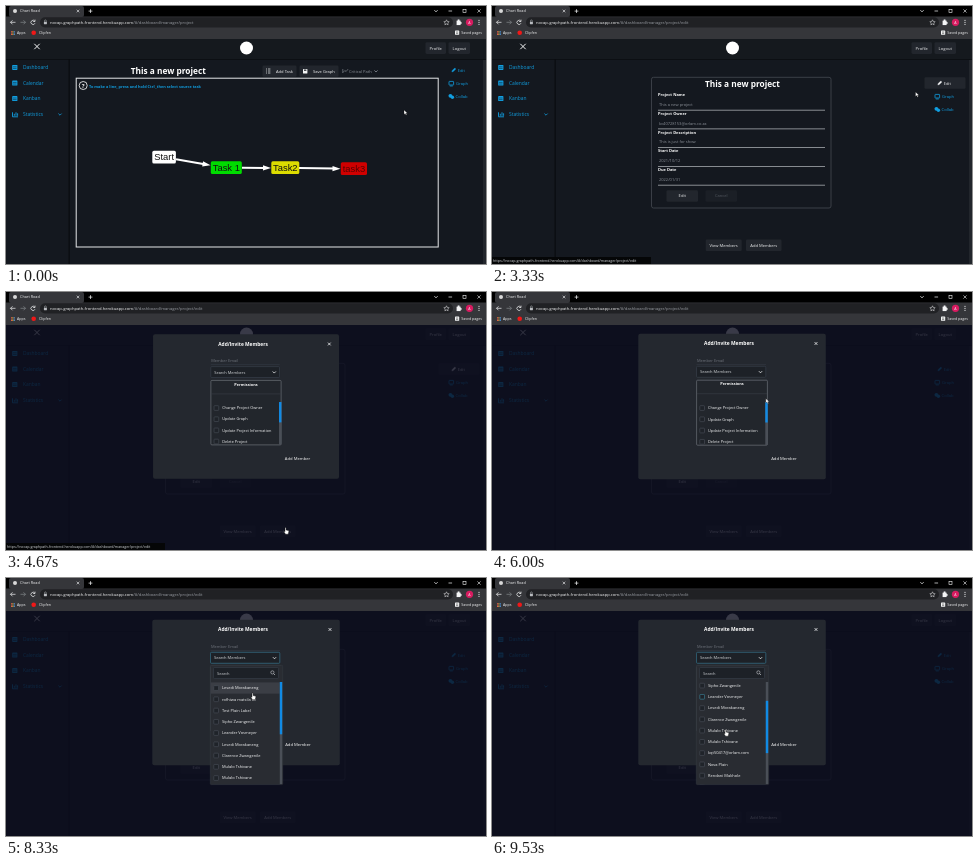
An HTML page for the animation above (9590 ms loop, 480 px wide and 258 px high).

```html
<!DOCTYPE html>
<html lang="en">
<head>
<meta charset="utf-8">
<title>Project dashboard</title>
<style>
html, body { margin: 0; width: 100%; height: 100%; overflow: hidden; background: #14181f; }
svg { display: block; width: 480px; height: 258px; font-family: "Open Sans", "Noto Sans", sans-serif; font-weight: 500; }
</style>
</head>
<body>
<svg id="stage" viewBox="0 0 480 258"></svg>
<script>
const LOOP = 9590;
const BLUE = '#119ee0', BUTTON = '#22262d', PALE = '#f4f5f6', DIM = '#8b9098', TOOLBAR = '#35363a';
const ROW = 11.25, LIST_TOP = 104.4, SCROLL = 36.2;

// Drawing helpers; text is placed by its vertical middle.
const text = (x, y, s, size, fill = PALE, extra = '') =>
  `<text x="${x}" y="${y + size * .35}" font-size="${size}" fill="${fill}" ${extra}>${s}</text>`;
const mid = (x, y, s, size, fill, extra = '') => text(x, y, s, size, fill, 'text-anchor="middle" ' + extra);
const BOLD = 'font-weight="700"';
const rect = (x, y, w, h, fill, r = 0, extra = '') =>
  `<rect x="${x}" y="${y}" width="${w}" height="${h}" rx="${r}" fill="${fill}" ${extra}/>`;
const dot = (x, y, r, fill) => `<circle cx="${x}" cy="${y}" r="${r}" fill="${fill}"/>`;
const path = (d, stroke = PALE, w = .7, fill = 'none') =>
  `<path d="${d}" stroke="${stroke}" stroke-width="${w}" fill="${fill}"/>`;
const cross = (x, y, r, w, color) => path(`M${x - r} ${y - r}l${2 * r} ${2 * r}m0 ${-2 * r}l${-2 * r} ${2 * r}`, color, w);
const chevron = (x, y, color) => path(`M${x - 1.6} ${y - .8}l1.6 1.6l1.6-1.6`, color, .8);
const button = (x, y, w, h, s, fill = BUTTON, color = PALE) =>
  rect(x, y, w, h, fill, 1.3) + mid(x + w / 2, y + h / 2, s, 4.1, color);
const group = (id, body, extra = '') => `<g id="${id}" ${extra}>${body}</g>`;

const HOST = 'nocap-graphpath-frontend.herokuapp.com';
const PATH = '/#/dashboard/manager/project';

function browser() {
  let apps = '';
  for (let i = 0; i < 9; i++)
    apps += rect(5 + i % 3 * 1.4, 25.2 + (i / 3 | 0) * 1.4, 1, 1, ['#e25a4a', '#f0b93a', '#4c9be8'][i % 3]);
  return rect(0, 0, 480, 33, TOOLBAR) + rect(0, 0, 480, 10.5, '#000') +
    rect(3, 0, 75, 11, TOOLBAR, 2) + dot(9, 5, 2, '#d8d8d8') + text(14, 5, 'Chart Road', 3.8) +
    cross(72, 5, 1.3, .6) + path('M84.5 3.2v3.8M82.6 5.1h3.8') +
    chevron(430, 5) + path('M442.5 5h3.6') + rect(457, 3.4, 3, 3, 'none', 0, `stroke="${PALE}" stroke-width=".6"`) + cross(473, 5, 1.6, .6) +
    path('M9.5 16.3h-5m2-2l-2 2l2 2') + path('M14.5 16.3h5m-2-2l2 2l-2 2', '#85888c') +
    path('M28.8 15.2a2.1 2.1 0 1 0 .2 2M29 13.6v1.9h-1.9') +
    rect(34, 11.3, 413, 10.2, '#202124', 5) +
    rect(37.9, 15.7, 3, 2.5, '#b9bcc0', .4) + path('M38.5 15.8v-1a.9 .9 0 0 1 1.8 0v1', '#b9bcc0', .5) +
    `<text x="44" y="17.8" font-size="4.15" fill="${PALE}">${HOST}<tspan id="address" fill="#999da3"></tspan></text>` +
    path('M440.5 13.8l.8 1.7l1.8.2l-1.3 1.3l.3 1.8l-1.6-.9l-1.6.9l.3-1.8l-1.3-1.3l1.8-.2z', PALE, .5) +
    path('M450.7 14.8h1.1a.9 .9 0 1 1 1.6 0h1.1v1.4a.8 .8 0 1 1 0 1.5v1.2h-3.8z', PALE, .2, PALE) +
    dot(463.5, 16.3, 3.6, '#d81b60') + mid(463.5, 16.3, 'A', 3.6) +
    [14.3, 16.3, 18.3].map(y => dot(473, y, .6, PALE)).join('') +
    apps + text(11, 26.8, 'Apps', 3.7) + dot(27.7, 26.8, 2.3, '#f01818') + text(33, 26.8, 'Clipfen', 3.7) +
    rect(449, 24.6, 4.2, 4.2, PALE, .6) + path('M450 26h2.2m-2.2 1.4h2.2', '#222', .5) +
    text(476, 26.8, 'Saved pages', 3.6, PALE, 'text-anchor="end"');
}

function shell() {
  const items = ['Dashboard', 'Calendar', 'Kanban', 'Statistics'].map((s, i) => {
    const y = 61.5 + i * 15.6;
    const icon = i == 3 ? path(`M6.5 ${y - 2}v4.5h5.5M8.3 ${y + 1.5}v-2M10 ${y + 1.5}v-3.5M11.6 ${y + 1.5}v-2.5`, BLUE, .9)
      : rect(6.2, y - 2.6, 5.2, 5, BLUE, .6) + path(`M7 ${y - .7}h3.6m-3.6 1.6h3.6`, '#13171d', .5);
    return icon + text(17, y, s, 4.9, BLUE);
  });
  return rect(0, 33, 480, 225, '#14181f') + rect(0, 33, 480, 20.5, '#15191e') +
    rect(0, 53, 480, .8, '#0b0d11') + rect(62.5, 53, 1.3, 205, '#0b0d11') + rect(477, 54, 3, 204, '#22262c') +
    cross(31, 40.5, 2.7, 1) + dot(240.5, 42, 6.5, '#fff') +
    button(419.5, 36.3, 20.5, 11.6, 'Profile') + button(442.5, 36.3, 21.5, 11.6, 'Logout') +
    items.join('') + chevron(54, 108.4, BLUE);
}

// Side links at their lower position; the graph page shifts them up.
function links(active) {
  const c = [0, 1, 2].map(i => i == active ? PALE : BLUE);
  return path('M445.8 79l.4-1.5l2.6-2.6l1.1 1.1l-2.6 2.6z', c[0], .3, c[0]) + text(451.7, 77.2, 'Edit', 4, c[0]) +
    rect(443, 88.4, 4.6, 3.6, 'none', .4, `stroke="${c[1]}" stroke-width=".8"`) + path('M443.8 93h3', c[1], .7) +
    text(450, 90.3, 'Graph', 4.2, c[1]) +
    dot(444.4, 102.8, 1.9, c[2]) + dot(446.4, 104.2, 1.7, c[2]) + text(449.5, 103.5, 'Collab', 4.2, c[2]);
}

function arrow(x1, y1, x2, y2) {
  const angle = Math.atan2(y2 - y1, x2 - x1) * 180 / Math.PI;
  const len = Math.hypot(x2 - x1, y2 - y1);
  return `<g transform="translate(${x1} ${y1}) rotate(${angle})">${path(`M0 0H${len - 6}`, '#fff', 2)}` +
    path(`M${len} 0l-8-2.6v5.2z`, 'none', 0, '#fff') + '</g>';
}

function graphPage() {
  const node = (x, y, w, s, fill, color = '#111') => rect(x, y, w, 12.8, fill, 1.6) +
    mid(x + w / 2, y + 6.2, s, 9.4, color, 'font-family="Liberation Sans, sans-serif" font-weight="400"');
  return mid(162.3, 65.5, 'This a new project', 8.3, '#fff', BOLD) +
    rect(256.5, 59.5, 34, 11.2, BUTTON, 1.3) + path('M260 63h1m1 0h2.4M260 65h1m1 0h2.4M260 67h1m1 0h2.4', PALE, .7) + text(270, 65.2, 'Add Task', 4.1) +
    rect(293.5, 59.5, 39, 11.2, BUTTON, 1.3) + rect(297, 63, 4.4, 4.4, PALE, .5) + rect(298, 63.5, 2.4, 1.3, BUTTON) + text(307, 65.2, 'Save Graph', 4.1) +
    path('M336.8 67v-4M337 66.5l1.8-2l1.3 1l2-2.4', DIM, .6) + text(343, 65.2, 'Critical Path', 4.1, DIM) + chevron(370, 65.2, DIM) +
    rect(70.2, 72.2, 362, 168.8, 'none', 0, 'stroke="#e4e6e8"') +
    '<circle cx="77.2" cy="79.5" r="4" fill="none" stroke="#fff" stroke-width=".8"/>' + mid(77.2, 79.5, '?', 6, '#fff', BOLD) +
    text(83, 81, 'To make a line, press and hold Ctrl ,then select source task', 3.85, BLUE, BOLD) +
    arrow(170, 153.2, 204.5, 159.2) + arrow(236, 161.8, 265, 162) + arrow(293, 162, 334.5, 162.7) +
    node(146.3, 144.8, 23.6, 'Start', '#fff') + node(204.8, 155.3, 31, 'Task 1', '#00dc00') +
    node(265.3, 155.3, 28, 'Task2', '#dcdc00') + node(334.8, 156.2, 26.2, 'task3', '#d00000', '#5a0000');
}

function editPage() {
  const fields = [['Project Name', 'This a new project'], ['Project Owner', 'kv40728153@orlam.co.za'],
    ['Project Description', 'This is just for show'], ['Start Date', '2021/10/12'], ['Due Date', '2022/01/31']];
  return rect(159.5, 71.3, 179.5, 130.7, 'none', 2, 'stroke="#444951" stroke-width=".8"') +
    mid(250.5, 77.8, 'This a new project', 8.3, '#fff', BOLD) +
    fields.map(([label, value], i) => {
      const y = 88.8 + i * 18.75;
      return text(166, y, label, 4, '#fff', BOLD) + text(167, y + 9.7, value, 4, DIM) + rect(166, y + 15, 167, .7, '#b9bdc2');
    }).join('') +
    button(174.5, 184.3, 31.5, 11.5, 'Edit') + button(213.5, 184.3, 31.5, 11.5, 'Cancel', '#1b1f26', '#555a62') +
    button(213.7, 233.5, 36, 11.5, 'View Members') + button(254, 233.5, 35.5, 11.5, 'Add Members');
}

const check = y => rect(207.8, y - 2.3, 4.7, 4.7, '#1f2329', .6, 'stroke="#4a5059" stroke-width=".6"');

function modalBox() {
  const rights = ['Change Project Owner', 'Update Graph', 'Update Project Information', 'Delete Project'];
  return rect(146.3, 41.7, 187.5, 145.6, '#24282f', 2) +
    mid(237, 51.7, 'Add/Invite Members', 4.9, '#fff', BOLD) + cross(324, 51.5, 1.4, .8) +
    text(205, 68.3, 'Member Email', 4, '#70757d') + rect(204.5, 72, 69.5, .5, '#343b45') +
    rect(204.5, 74.3, 69.3, 11, '#1d2127', 1, 'stroke="#3c4450" stroke-width=".6"') + text(208, 80, 'Search Members', 4, '#d5d8db') + chevron(268.5, 80) +
    rect(204.6, 88.2, 70.8, 65, '#22262c', 1, 'stroke="#787d85" stroke-width=".6"') +
    mid(240, 92, 'Permissions', 3.9, '#fff', BOLD) + rect(205, 101.6, 70, .5, '#3c424b') +
    rights.map((s, i) => check(116 + i * ROW) + text(216, 116 + i * ROW, s, 3.9)).join('') +
    rect(273.3, 110, 2.4, 43, '#4a4f57') + rect(273.3, 110, 2.4, 20.5, '#118ae4') +
    text(279.2, 166.5, 'Add Member', 4.2, '#fff');
}

const people = ['Lesedi Morakaneng', 'rofhiwa matsila tb', 'Test Plain Label', 'Sipho Zwangenile', 'Leander Vosmeyer',
  'Lesedi Morakaneng', 'Clarence Zwangenile', 'Mulalo Tshivane', 'Mulalo Tshivane', 'kqt50417@orlam.com', 'Nova Plain', 'Rendani Makhole', 'Sipho Zwangenile'];

function dropdownBox() {
  return rect(204.5, 74.3, 69.3, 11, 'none', 1, 'stroke="#2a6f86" stroke-width=".6"') +
    rect(204.3, 87.3, 72.4, 119.3, '#292c32', 1, 'stroke="#383d45" stroke-width=".5"') +
    rect(207.5, 89.5, 65, 11, '#1d2127', 1, 'stroke="#3c4450" stroke-width=".5"') + text(211, 95.1, 'Search', 4, '#c9ccd0') +
    '<circle cx="266.4" cy="94.4" r="1.6" fill="none" stroke="#c9ccd0" stroke-width=".6"/>' + path('M267.6 95.6l1.4 1.4', '#c9ccd0') +
    '<clipPath id="listClip"><rect x="204.4" y="104" width="72" height="102.3"/></clipPath><g clip-path="url(#listClip)">' +
    group('list', rect(204.5, 0, 69.2, ROW, '#3b3e45', 0, 'id="hover"') + people.map((s, i) => {
      const y = 110 + i * ROW;
      return check(y) + text(216, y, s, 4);
    }).join('') + rect(207.8, 0, 4.7, 4.7, 'none', .6, 'id="hoverCheck" stroke="#2a7488" stroke-width=".6"')) + '</g>' +
    rect(273.8, 104, 2.4, 102, '#4a4f57') + rect(273.8, 104, 2.4, 52.3, '#118ae4', 0, 'id="thumb"');
}

document.getElementById('stage').innerHTML =
  browser() + shell() + group('graph', graphPage()) + group('edit', editPage()) +
  group('pill', rect(432.5, 71.2, 41, 11.6, BUTTON, 1.3)) +
  group('linksIdle', links(-1)) + group('linksGraph', links(1), 'transform="translate(0 -13)"') + group('linksEdit', links(0)) +
  group('backdrop', rect(0, 33, 480, 225, '#0c0d1e', 0, 'opacity=".81"')) +
  group('modal', modalBox()) + group('dropdown', dropdownBox()) +
  group('status', rect(0, 251, 159, 7, '#050607', 0, 'id="statusBack"') + text(1, 254.5, '', 3.57, '#d3d6da', 'id="statusText"')) +
  group('cursor', group('pointer', path('M0 0v4.6l1.2-1l.8 1.6l.8-.4l-.8-1.6h1.5z', '#000', .3, '#fff')) +
    group('hand', path('M0 .3q.7-.6 1.1.2v2l2.3.6q.6.3.4 1.2l-.6 2.4h-2.6l-1.9-2.6q.2-.7 1.3.2z', '#000', .4, '#fff')));

const el = {};
document.querySelectorAll('[id]').forEach(e => el[e.id] = e);
const show = (id, on) => el[id].style.display = on ? '' : 'none';
const write = (id, s) => { if (el[id].textContent !== s) el[id].textContent = s; };
const clamp = v => Math.max(0, Math.min(1, v));

// Cursor stops: time, x, y of the tip.
const stops = [[70, 398, 104], [520, 453, 64], [730, 451, 78], [2069, 451, 78], [2070, 451, 67], [2600, 451, 67], [2730, 451, 65],
  [3200, 451, 65], [3330, 423.5, 86], [3930, 281, 234], [4130, 281, 234], [4200, 279, 235.5],
  [4870, 279, 235.5], [5800, 275.5, 108], [5930, 275.5, 108], [6450, 242, 78], [7270, 242, 78], [7870, 246, 115],
  [8330, 246, 115], [9200, 233, 151.5]];

function cursorAt(t) {
  const next = stops.findIndex(s => s[0] > t);
  if (next < 1) return (next ? stops[stops.length - 1] : stops[0]).slice(1);
  const [t0, x0, y0] = stops[next - 1], [t1, x1, y1] = stops[next];
  const k = (t - t0) / (t1 - t0), e = k * k * (3 - 2 * k);
  return [x0 + (x1 - x0) * e, y0 + (y1 - y0) * e];
}

function draw(now) {
  const t = now % LOOP;
  const [x, y] = cursorAt(t);
  const editing = t >= 3200, modal = t >= 4470;
  const hovering = t >= 530 && t < 4930;
  const hand = t >= 530 && t < 3250 || t >= 3860 && t < 4930 || t >= 6400;

  show('graph', !editing);
  show('edit', editing);
  show('pill', hovering);
  show('linksIdle', !hovering);
  show('linksGraph', hovering && !editing);
  show('linksEdit', hovering && editing);
  el.linksIdle.setAttribute('transform', `translate(0 ${editing ? 0 : -13})`);
  write('address', PATH + (editing ? '/edit' : ''));

  show('status', hovering);
  const long = t >= 2665;
  write('statusText', 'https://' + HOST + PATH + (long ? '/edit' : ''));
  el.statusBack.setAttribute('width', long ? 159 : 150);

  show('backdrop', modal);
  show('modal', modal);
  const scale = t < 4670 ? .975 : t < 4730 ? .992 : 1;
  el.modal.setAttribute('transform', `translate(240 114.5) scale(${scale}) translate(-240 -114.5)`);
  el.modal.setAttribute('opacity', t < 4670 ? .85 : 1);

  show('dropdown', t >= 6450);
  const scroll = SCROLL * clamp((t - 9265) / 265);
  const row = Math.floor((y - LIST_TOP) / ROW), over = t > 7270 && row >= 0;
  el.list.setAttribute('transform', `translate(0 ${-scroll})`);
  el.thumb.setAttribute('y', 104 + scroll * .52);
  show('hover', over && !scroll);
  show('hoverCheck', over && scroll > 0);
  el.hover.setAttribute('y', LIST_TOP + row * ROW);
  el.hoverCheck.setAttribute('y', 107.7 + row * ROW);

  show('hand', hand);
  show('pointer', !hand);
  el.cursor.setAttribute('transform', `translate(${x} ${y})`);
}

const start = performance.now();
(function tick() {
  draw(performance.now() - start);
  requestAnimationFrame(tick);
})();
</script>
</body>
</html>
```
